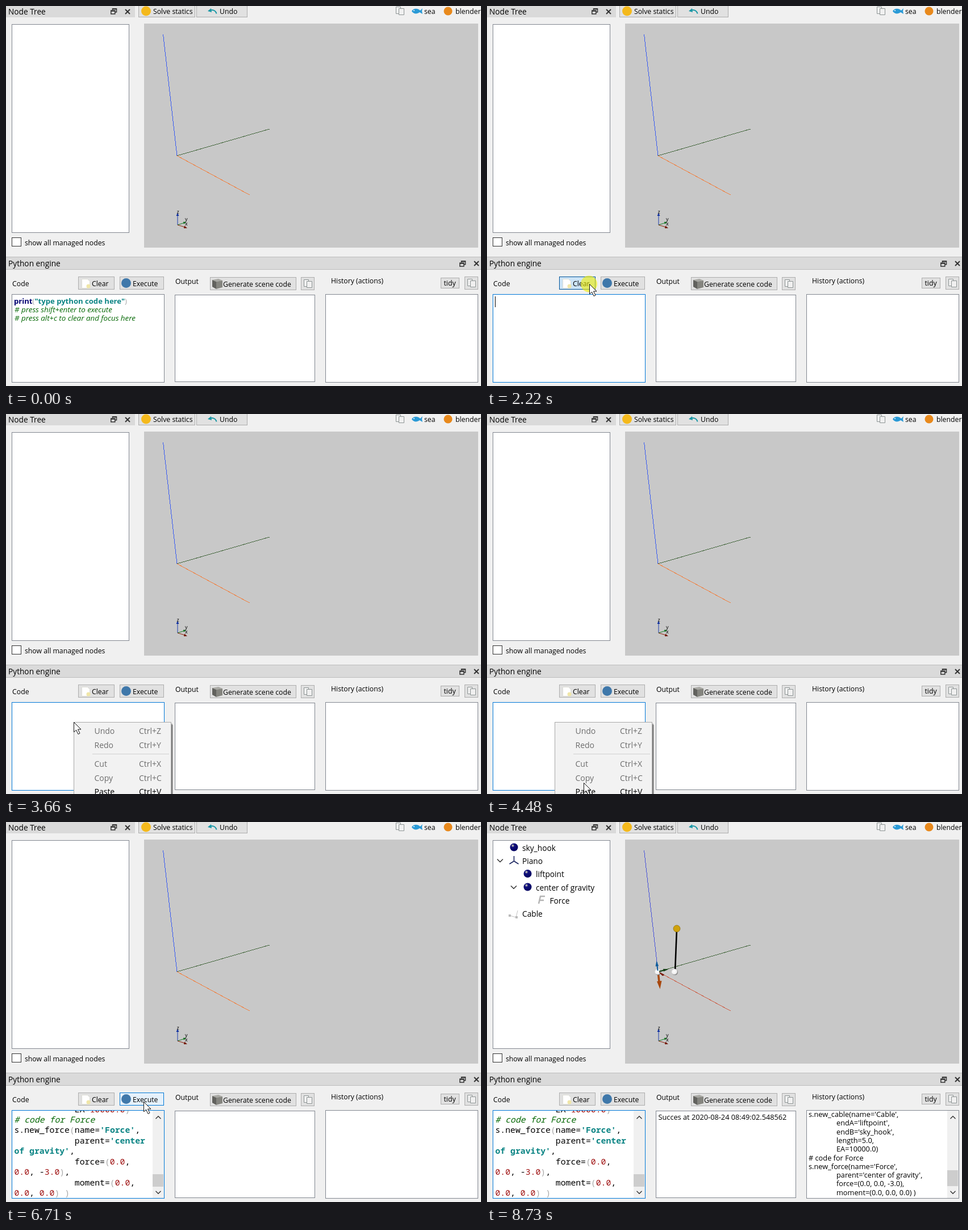
These frames come from a looping animation (836x670 px, 9.35 s). An HTML page:

```html
<!DOCTYPE html>
<html lang="en">
<head>
<meta charset="utf-8">
<title>Python engine</title>
<style>
html, body { margin: 0; height: 100%; overflow: hidden; background: #f0f0f0 }
svg { display: block; width: 836px; height: 670px }
text { font: 12.25px "Open Sans", "Noto Sans", sans-serif; white-space: pre; fill: #000 }
rect, .axes { shape-rendering: crispEdges }
.big text, text.big { font-size: 13.7px }
.out text { font-size: 12.75px }
.menu text { font-size: 14px; fill: #6d6d6d }
.menu .on { fill: #000 }
.tiny text { font-size: 9px }
.hint text { font-size: 13.1px }
.hint .c { font-size: 13.35px }
.code text { font: 14.78px "Noto Sans Mono", "DejaVu Sans Mono", monospace }
.k { font-weight: 700; fill: #000070 }
.s { font-weight: 700; fill: #0b8484 }
.n { fill: #a01414 }
.p { fill: #a8a8a8 }
.c, .code .c { font-style: italic; fill: #056805 }
.bar { fill: #dadada }
.box { fill: #fff; stroke: #828790 }
.box.focus { stroke: #0078d7 }
.btn { fill: #e1e1e1; stroke: #adadad }
.btn.hover { fill: #e5f1fb; stroke: #0078d7 }
.btn.press { fill: #cce4f7; stroke: #005499 }
.line { fill: none; stroke: #333; stroke-width: 1.5 }
</style>
</head>
<body>
<svg viewBox="0 0 836 670">
<defs>
  <g id="copy" fill="#f0f0f0" stroke="#8d9494"><path d="M.5 .5h8v12h-8z"/><path d="M5.500 3.500h9v11h-9z"/></g>
  <g id="float" class="line"><path d="M3.500 3V.8h7v6H8"/><path d="M.8 4h7v6h-7zM.8 5h7M3 1.500h8"/></g>
  <path id="close" class="line" style="stroke-width:2" d="M0 0l8 8M8 0l-8 8"/>
  <path id="chev" class="line" d="M-5 -2.500l5 5 5-5"/>
  <radialGradient id="navy" cx=".35" cy=".3" r=".7"><stop stop-color="#f0f0c0"/><stop offset=".3" stop-color="#10107c"/><stop offset="1" stop-color="#000060"/></radialGradient>
  <radialGradient id="pearl" cx=".4" cy=".4" r=".6"><stop stop-color="#fff"/><stop offset=".7" stop-color="#eee"/><stop offset="1" stop-color="#777"/></radialGradient>
  <circle id="ball" r="7" fill="url(#navy)"/>
  <g id="scroll">
    <rect width="20" height="154" fill="#f0f0f0"/>
    <use href="#chev" transform="translate(10 12) scale(.9 -.9)"/>
    <use href="#chev" transform="translate(10 144) scale(.9)"/>
  </g>
  <clipPath id="codeClip"><path d="M11 509h267v154.500H11z"/></clipPath>
</defs>

<!-- node tree -->
<rect class="bar" width="227" height="20"/>
<text class="big" x="4" y="15">Node Tree</text>
<use href="#float" x="184" y="4"/><use href="#close" x="210" y="6"/>
<rect class="box" x="10.500" y="32.500" width="206" height="367"/>
<rect x="10.500" y="408.500" width="16" height="15" fill="#fff" stroke="#333"/>
<text x="33" y="422">show all managed nodes</text>

<!-- toolbar -->
<rect class="btn" x="233.500" y="-5.500" width="99" height="25"/>
<circle cx="246.500" cy="9" r="8.500" fill="#f4b91c"/>
<text x="259" y="14">Solve statics</text>
<rect class="btn" x="335.500" y="-5.500" width="89" height="25"/>
<path d="M357 8.500c6-3 12-1 13.500 5" fill="none" stroke="#1b98a6" stroke-width="2"/>
<path d="M355 9l6-5 1 7z" fill="#1b98a6"/>
<text x="376" y="14">Undo</text>
<use href="#copy" x="686" y="1"/>
<path d="M714 9c3-5 10-6 15-1l4-4-1 5 1 5-5-3c-5 4-11 3-14-2z" fill="#2a9ad6"/><circle cx="718" cy="8" r="1" fill="#fff"/>
<text x="736" y="14">sea</text>
<circle cx="778" cy="9" r="7.500" fill="#e8891c"/>
<text x="791" y="14">blender</text>

<!-- viewport -->
<rect x="243" y="31" width="588" height="395" fill="#c8c8c8"/>
<g class="axes" fill="none">
  <path id="axZ" d="M276.500 50L301 264"/>
  <path id="axY" d="M301 264L463.500 217" stroke="#46683f"/>
  <path id="axX" d="M301 264L428.500 333"/>
</g>
<g class="tiny">
  <path d="M302 386V368" stroke="#1c3fae"/><path d="M299.500 370l2.500-5 2.500 5z" fill="#0c2f9e"/>
  <path d="M302 386l11-3.500" stroke="#107a20"/><path d="M312 380.500l5 .5-4 3.500z" fill="#0a6a18"/>
  <path d="M302 386l13 4" stroke="#8a2008"/><path d="M314 387.500l5 4-6 .5z" fill="#701404"/>
  <text x="300.500" y="366">z</text><text x="315" y="379">y</text><text x="315" y="387">x</text>
</g>

<!-- python engine -->
<rect class="bar" y="443" width="836" height="22"/>
<path d="M0 442.500h836M0 464.500h836" stroke="#bdbdbd"/>
<text class="big" x="4" y="459">Python engine</text>
<use href="#float" x="798" y="449"/><use href="#close" x="824" y="450"/>
<text x="11" y="494">Code</text>
<rect id="clear" class="btn" x="127.500" y="477.500" width="63" height="22"/>
<path d="M133.500 481.500h10l4 4v12h-14z" fill="#fff" stroke="#dcdcd4"/><circle cx="145" cy="494" r="3.500" fill="#f0e6a8"/>
<text x="151" y="494">Clear</text>
<rect id="exec" class="btn" x="200.500" y="477.500" width="77" height="22"/>
<circle cx="211.500" cy="488.500" r="8.500" fill="#3f78aa"/>
<text x="223" y="494">Execute</text>
<text x="298" y="490">Output</text>
<rect class="btn" x="359.500" y="478.500" width="151" height="22"/>
<path d="M363 483l11-2 7 3-11 2z" fill="#a9a9a4"/><path d="M363 483l7 3v13l-7-4z" fill="#62625e"/><path d="M370 486l11-2v12l-11 3z" fill="#85857f"/>
<text x="382" y="495">Generate scene code</text>
<rect class="btn" x="519.500" y="478.500" width="23" height="22"/><use href="#copy" x="524" y="482"/>
<text x="572" y="489">History (actions)</text>
<rect class="btn" x="765.500" y="479.500" width="32" height="18"/><text x="770.500" y="493">tidy</text>
<rect class="btn" x="807.500" y="477.500" width="23" height="22"/><use href="#copy" x="812" y="481"/>
<rect id="codeBox" class="box" x="10.500" y="508.500" width="268" height="155"/>
<rect class="box" x="297.500" y="509.500" width="246" height="153"/>
<rect class="box" x="562.500" y="508.500" width="268" height="155"/>

<g id="hint" class="hint">
  <text x="14" y="525"><tspan class="k">print</tspan><tspan class="p">(</tspan><tspan class="s">"type python code here"</tspan><tspan class="p">)</tspan></text>
  <text class="c" x="15" y="540"># press shift+enter to execute</text>
  <text class="c" x="15" y="555"># press alt+c to clear and focus here</text>
</g>

<g id="pasted" clip-path="url(#codeClip)">
  <g class="code">
    <text x="14.500" y="511.500">            EA=<tspan class="n">10000.0</tspan><tspan class="p">)</tspan></text>
    <text x="14.500" y="529.500" class="c"># code for Force</text>
    <text x="14.500" y="548">s.new_force<tspan class="p">(</tspan>name=<tspan class="s">'Force'</tspan>,</text>
    <text x="14.500" y="566.500">            parent=<tspan class="s">'center</tspan></text>
    <text x="14.500" y="585"><tspan class="s">of gravity'</tspan>,</text>
    <text x="14.500" y="603.500">            force=<tspan class="p">(</tspan><tspan class="n">0.0</tspan>,</text>
    <text x="14.500" y="622"><tspan class="n">0.0</tspan>, -<tspan class="n">3.0</tspan><tspan class="p">)</tspan>,</text>
    <text x="14.500" y="640.500">            moment=<tspan class="p">(</tspan><tspan class="n">0.0</tspan>,</text>
    <text x="14.500" y="659"><tspan class="n">0.0</tspan>, <tspan class="n">0.0</tspan><tspan class="p">) )</tspan></text>
  </g>
  <use href="#scroll" x="258" y="509"/>
  <rect x="258" y="621" width="19" height="22" fill="#cdcdcd"/>
</g>
<rect id="caret" width="1" height="19"/>

<g id="result">
  <g class="big">
    <use href="#ball" x="47.500" y="44.500"/><text x="62" y="51">sky_hook</text>
    <use href="#chev" x="23" y="68"/>
    <path class="line" style="stroke:#16205c" d="M47.500 60v9l-8 5M47.500 69l8 5"/><text x="62" y="74">Piano</text>
    <use href="#ball" x="71.500" y="91"/><text x="86" y="97">liftpoint</text>
    <use href="#chev" x="47" y="115"/><use href="#ball" x="71.500" y="114.500"/><text x="86" y="121">center of gravity</text>
    <path d="M91 144l3-13h8M93 138h7" fill="none" stroke="#b4b4b4" stroke-width="2.500"/><text x="110.500" y="144">Force</text>
    <path d="M40 165l11 3 3-12" fill="none" stroke="#c4c4c4"/><path d="M38 163h4v4h-4zM50 166h4v4h-4z" fill="#bbb"/><text x="62" y="167">Cable</text>
  </g>
  <path d="M331 264L334 188" stroke="#000" stroke-width="2.600"/>
  <circle cx="334" cy="188" r="6" fill="#d0a20c" stroke="#8a6a08" stroke-width=".7"/>
  <circle cx="330.500" cy="264.500" r="5.500" fill="url(#pearl)"/>
  <path d="M301.500 268l1.500 14" stroke="#a8480e" stroke-width="3.500"/><path d="M299 281l8.500-1-3 14.500z" fill="#a8480e"/>
  <circle cx="301" cy="264.500" r="5.500" fill="url(#pearl)"/>
  <path d="M300.500 262l-1-8" stroke="#0f5c9c" stroke-width="2"/><path d="M296.500 254.500l2-10 3.500 9.500z" fill="#0f5c9c"/>
  <path d="M303 263.500l8-2" stroke="#123f14" stroke-width="2"/><path d="M310 259l10 .5-9 4z" fill="#123f14"/>
  <path d="M303 265l9 4.500-3 1.500z" fill="#7a1c08" stroke="#7a1c08"/>
  <g class="out">
    <text x="301.500" y="525">Succes at 2020-08-24 08:49:02.548562</text>
    <g id="history"></g>
  </g>
  <use href="#scroll" x="810" y="509"/>
  <rect x="810" y="614" width="19" height="28" fill="#cdcdcd"/>
</g>

<g id="menu" class="menu">
  <path d="M124 548h170v130H124z" fill="#000" opacity=".25"/>
  <path d="M122 546h171v130H122z" fill="#000" opacity=".3"/>
  <rect x="119.500" y="543.500" width="171" height="140" fill="#f2f2f2" stroke="#a8a8a8"/>
  <path d="M152 599.500h135" stroke="#d0d0d0"/>
  <rect id="pick" x="122" y="654" width="165" height="24" fill="#91c9f7"/>
  <text x="155.500" y="564">Undo</text><text x="234" y="564">Ctrl+Z</text>
  <text x="155.500" y="589">Redo</text><text x="234" y="589">Ctrl+Y</text>
  <text x="155.500" y="622">Cut</text><text x="234" y="622">Ctrl+X</text>
  <text x="155.500" y="647">Copy</text><text x="234" y="647">Ctrl+C</text>
  <text class="on" x="155.500" y="671">Paste</text><text class="on" x="234" y="671">Ctrl+V</text>
</g>

<circle id="click" cx="179.500" cy="490" r="14.500" fill="#f0ee00" opacity=".6"/>
<g id="mouse">
  <path id="arrow" d="M.5 .5v17.500l4-4 3.500 7.500 3-1.500-3.500-7h5.500z" fill="#fff" stroke="#111"/>
  <path id="beam" d="M-5 -8.500h4l1 1 1-1h4M0 -8v16M-5 8.500h4l1-1 1 1h4" fill="none" stroke="#111" stroke-width="1.500"/>
</g>
</svg>
<script>
const LOOP = 9350;
const $ = id => document.getElementById(id);
const show = (id, on) => $(id).style.display = on ? "" : "none";

const log = `s.new_cable(name='Cable',
>endA='liftpoint',
>endB='sky_hook',
>length=5.0,
>EA=10000.0)
# code for Force
s.new_force(name='Force',
>parent='center of gravity',
>force=(0.0, 0.0, -3.0),
>moment=(0.0, 0.0, 0.0) )`;
$("history").innerHTML = log.split("\n").map((s, i) =>
  `<text x="${s[0] == ">" ? 615 : 566}" y="${520 + i * 15.3}">${s.replace(">", "")}</text>`).join("");

// pointer stops: time, x, y
const stops = [
  [800, 534, 623], [1000, 290, 538], [1200, 192, 501], [1420, 184, 494], [1620, 180, 490],
  [2840, 172, 503], [3040, 154, 519], [3240, 131, 536], [3440, 119, 543],
  [4060, 127, 562], [4260, 148, 608], [4470, 170, 650], [4680, 177, 664],
  [5690, 179, 655], [5900, 189, 624], [6100, 208, 575], [6300, 228, 527], [6510, 239, 500], [6710, 242, 493],
  [8330, 330, 535], [8530, 589, 657], [8730, -50, -50]
];
const blinks = [2220, 2840, 3240, 3660, 5080, 5690, 6300, 6710, 7310, 7710, 8330, 8730];

function draw() {
  const t = performance.now() % LOOP;
  const during = (a, b) => t >= a && t < b;
  const [, x, y] = stops.filter(s => s[0] <= t).pop() || [0, -50, -50];
  const inside = (l, r, top, bottom) => x >= l && x <= r && y >= top && y <= bottom;
  const menu = during(3660, 5080), pasted = t >= 5080, done = t >= 7310;

  show("hint", t < 2220);
  show("pasted", pasted);
  show("result", done);
  show("menu", menu);
  show("pick", y > 653);
  show("click", during(2220, 2440));
  show("caret", blinks.filter(b => b <= t).length % 2);
  $("caret").setAttribute("x", pasted ? 112 : 14);
  $("caret").setAttribute("y", pasted ? 645 : 512);

  const press = during(2220, 2440) ? " press" : "";
  $("clear").setAttribute("class", "btn" + (inside(127, 191, 477, 500) ? " hover" + press : ""));
  $("exec").setAttribute("class", "btn" + (inside(200, 278, 477, 500) ? " hover" : ""));
  $("codeBox").setAttribute("class", t < 2220 ? "box" : "box focus");
  $("axZ").style.stroke = done ? "#4a55d8" : "#3a5cf0";
  $("axX").style.stroke = done ? "#cc6048" : "#f08040";

  const overText = !menu && (inside(11, 258, 509, 664) || inside(298, 543, 510, 663) || inside(563, 810, 509, 663));
  show("beam", overText);
  show("arrow", !overText);
  $("mouse").setAttribute("transform", `translate(${x} ${y})`);
  requestAnimationFrame(draw);
}
draw();
</script>
</body>
</html>
```
